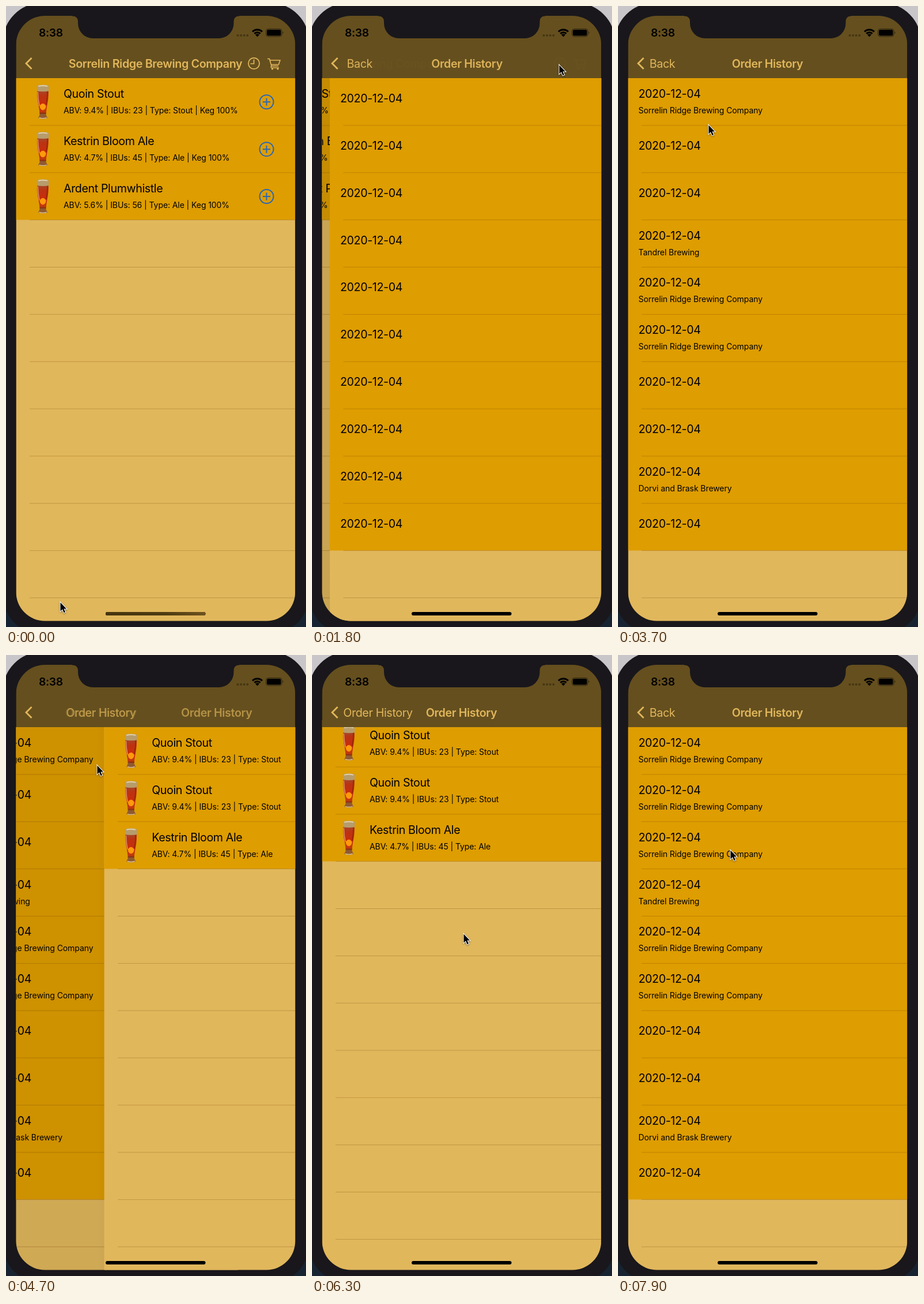
Animation of 521 by 1076 pixels, one loop 8 s. Source, as an HTML page with a canvas:

```html
<!DOCTYPE html>
<html lang="en">
<head>
<meta charset="utf-8">
<title>Order history</title>
<style>
html, body { margin: 0; width: 521px; height: 1076px; overflow: hidden; background: #19171b; }
canvas { display: block; }
</style>
</head>
<body>
<canvas id="stage" width="521" height="1076"></canvas>
<script>
const c = document.getElementById('stage').getContext('2d');
const LEFT = 17.5, RIGHT = 502.3, WIDTH = RIGHT - LEFT, TOP = 125, ROW = 81.85;
const GOLD = '#e1b75c', ORANGE = '#de9d00', BAR = '#654f1e';

const BREWERY = 'Sorrelin Ridge Brewing Company';
const stout = ['Quoin Stout', 'ABV: 9.4% | IBUs: 23 | Type: Stout'];
const ale = ['Kestrin Bloom Ale', 'ABV: 4.7% | IBUs: 45 | Type: Ale'];
const orange = ['Ardent Plumwhistle', 'ABV: 5.6% | IBUs: 56 | Type: Ale'];
const menu = [stout, ale, orange], order = [stout, stout, ale];

// brewery and the time its line appears, per order row
const orders = [
  [BREWERY, 3450], [BREWERY, 7550], [BREWERY, 7750], ['Tandrel Brewing', 3100],
  [BREWERY, 2800], [BREWERY, 2600], null, null, ['Dorvi and Brask Brewery', 2300], null
];

const cursorPath = [
  [0, 93, 1031], [100, 93, 1031], [900, 400, 160], [1300, 428, 100], [1900, 428, 100],
  [2300, 250, 815], [2600, 220, 575], [2800, 215, 493], [3100, 200, 411], [3500, 160, 215],
  [3700, 156, 204], [4300, 157, 189], [4800, 157, 189], [5500, 262, 508], [6050, 262, 508],
  [6300, 262, 481], [6450, 262, 481], [6950, 107, 93], [7250, 107, 93], [7550, 190, 240],
  [7800, 194, 336], [8000, 194, 336]
];

const clamp = v => Math.max(0, Math.min(1, v));
const smooth = v => (v = clamp(v), v * v * (3 - 2 * v));
const spring = ms => {
  const x = Math.max(0, ms) * 0.014;
  return x > 8 ? 1 : 1 - (1 + x) * Math.exp(-x);
};
const pushHistory = t => spring(t - 1412);
const pushDetail = t => t < 7027 ? spring(t - 4532) : 1 - spring(t - 7027);
const scrollAt = t => -13 * (t < 6300 ? smooth((t - 6050) / 250) : 1 - spring(t - 6310));

function text(s, x, y, size = 19.6, weight = 400, color = '#000', align = 'left') {
  c.font = `${weight} ${size}px Inter, Roboto, sans-serif`;
  c.letterSpacing = size > 16 ? '-0.36px' : '-0.08px';
  c.fillStyle = color;
  c.textAlign = align;
  c.fillText(s, x, y);
}

function rect(x, y, w, h, color) {
  c.fillStyle = color;
  c.fillRect(x, y, w, h);
}

function shape(d, fill, stroke, width = 2) {
  const path = new Path2D(d);
  if (fill) { c.fillStyle = fill; c.fill(path); }
  if (stroke) { c.strokeStyle = stroke; c.lineWidth = width; c.stroke(path); }
}

function round(x, y, w, h, r, color) {
  c.beginPath();
  c.roundRect(x, y, w, h, r);
  c.fillStyle = color;
  c.fill();
}

function ring(x, y, r, color, width = 2) {
  c.beginPath();
  c.arc(x, y, r, 0, 7);
  c.strokeStyle = color;
  c.lineWidth = width;
  c.stroke();
}

const beerFill = c.createLinearGradient(0, 22, 0, 62);
[[0, '#a5482a'], [0.2, '#bb3312'], [0.6, '#c92d0a'], [0.9, '#c53a0c'], [1, '#7d2f14']]
  .forEach(([at, color]) => beerFill.addColorStop(at, color));

function glass(x, y) {
  c.save();
  c.translate(x, y);
  shape('M-5 59H5Q5 64 8 69Q0 72.5 -8 69Q-5 64 -5 59Z', '#8f5a30');
  shape('M-10 21H10Q10 36 7.5 47Q6 55 5.5 62H-5.5Q-6 55 -7.5 47Q-10 36 -10 21Z', beerFill);
  shape('M-8.8 24Q-8.5 37 -6 48', null, '#e0a27a', 1.3);
  shape('M8 23Q8 36 5.5 47', null, '#8e2008', 1.3);
  shape('M-5.5 48Q0 40 5.5 48Q5 55 0 55.5Q-5 55 -5.5 48Z', '#ff9a0c');
  shape('M-6.5 68.5Q0 71 6.5 68.5', null, '#d8c29a', 1.5);
  shape('M-10.5 14Q-10 11.5 0 11.5Q10 11.5 10.5 14L10 22.5Q0 24 -10 22.5Z', '#b79c6c');
  shape('M-8 14Q0 12 8 14', null, '#dfcfa7', 2);
  c.restore();
}

function beerRow([name, info], y, keg) {
  glass(46.5, y);
  text(name, 82.5, y + 34);
  text(info + (keg ? ' | Keg 100%' : ''), 82.5, y + 61, 14);
  if (keg) {
    ring(435, y + 41.3, 12, '#2868b8');
    shape(`M428.5 ${y + 41.3}h13M435 ${y + 34.8}v13`, null, '#2868b8');
  }
}

function orderRow(entry, y, t) {
  const loaded = entry && t >= entry[1];
  text('2020-12-04', 18, y + (loaded ? 34 : 42));
  if (loaded) text(entry[0], 18, y + 61, 14);
}

function page(x, scroll, rows, drawRow) {
  c.save();
  c.translate(LEFT + x, 0);
  rect(0, TOP, WIDTH, 960, GOLD);
  rect(0, TOP + scroll, WIDTH, rows.length * ROW, ORANGE);
  rows.forEach((row, i) => drawRow(row, TOP + scroll + i * ROW));
  for (let i = 1; i < 13; i++)
    rect(23.5, TOP + scroll + i * ROW - 0.4, WIDTH, 1, 'rgba(115,75,0,.3)');
  c.restore();
}

// left page slides at 30 % speed and dims beneath the incoming one
function slide(p, under, over) {
  const x = WIDTH * (1 - p);
  if (p < 1) under(-0.3 * WIDTH * p);
  if (p > 0) {
    const edge = LEFT + x, shade = c.createLinearGradient(edge - 12, 0, edge, 0);
    rect(LEFT, TOP, x, 960, `rgba(0,0,0,${0.11 * p})`);
    shade.addColorStop(0, 'rgba(0,0,0,0)');
    shade.addColorStop(1, `rgba(0,0,0,${0.1 * p * (1 - p)})`);
    rect(edge - 12, TOP, 12, 960, shade);
    over(x);
  }
}

function icons() {
  ring(430.5, 99.5, 9.6, GOLD, 1.7);
  shape('M430.5 92.5V100H424.5', null, GOLD, 1.7);
  shape('M454 91.5H457.5L461 104H473M458.5 94H476L473.5 101.5H460.5M461 104Q459 107 462 107H474', null, GOLD, 1.6);
  c.fillStyle = GOLD;
  for (const x of [462.5, 472]) {
    c.beginPath();
    c.arc(x, 109, 1.6, 0, 7);
    c.fill();
  }
}

const bars = [
  { title: BREWERY, back: '', mid: 55, icons },
  { title: 'Order History', back: 'Back', mid: 77 },
  { title: 'Order History', back: 'Order History', mid: 114.5 }
];

function navBar(from, to, q) {
  const put = (s, x, alpha, weight) => {
    c.globalAlpha = clamp(alpha);
    text(s, x, 106.5, 19.7, weight, GOLD, 'center');
  };
  const x = 259.5 + (to.mid - 259.5) * q;
  c.save();
  c.beginPath();
  c.rect(37, TOP - 50, RIGHT - 37, 50);
  c.clip();
  put(from.title, x, 1 - q, 600);
  put(to.back, x, q, 400);
  put(from.back, from.mid - 127 * q, 1 - 1.2 * q, 400);
  put(to.title, 259.5 + 305 * (1 - q), q, 600);
  if (from.icons) {
    c.globalAlpha = 1 - q;
    from.icons();
  }
  c.restore();
  shape('M44.5 90L35 99.5L44.5 109', null, GOLD, 2.8);
}

function statusBar() {
  text('8:38', 57, 53, 19.3, 600);
  for (let i = 0; i < 4; i++) {
    c.beginPath();
    c.arc(402.5 + i * 5.6, 51, 2, 0, 7);
    c.fillStyle = '#463614';
    c.fill();
  }
  c.strokeStyle = '#000';
  c.lineWidth = 3;
  for (const r of [12, 7.2]) {
    c.beginPath();
    c.arc(436.5, 53, r, -Math.PI * 0.75, -Math.PI * 0.25);
    c.stroke();
  }
  shape('M436.5 53.5L433 49.8Q436.5 47 440 49.8Z', '#000');
  c.beginPath();
  c.roundRect(451.5, 39.5, 27.5, 13.5, 4);
  c.strokeStyle = '#30260e';
  c.lineWidth = 1;
  c.stroke();
  round(453, 41, 24.5, 10.5, 2.5, '#000');
  shape('M480.5 44Q483 46.2 480.5 48.5Z', '#30260e');
}

function homeBar(t) {
  round(173, 1050, 173.5, 6, 3, '#000');
  const fade = 1 - smooth((t - 100) / 400);
  if (!fade) return;
  const tint = c.createLinearGradient(173, 0, 346, 0);
  tint.addColorStop(0, '#46350f');
  tint.addColorStop(0.6, '#4e3b12');
  tint.addColorStop(1, '#6e531e');
  c.globalAlpha = fade;
  round(173, 1050, 173.5, 6, 3, tint);
  c.globalAlpha = 1;
}

function cursor(t) {
  const i = cursorPath.findIndex(k => k[0] > t);
  const a = cursorPath[i - 1], b = cursorPath[i], k = smooth((t - a[0]) / (b[0] - a[0]));
  c.save();
  c.translate(a[1] + (b[1] - a[1]) * k, a[2] + (b[2] - a[2]) * k);
  c.shadowColor = 'rgba(0,0,0,.35)';
  c.shadowBlur = 3;
  c.shadowOffsetY = 1;
  const arrow = 'M1.5 2.5V17.5L5 14.3L7.6 20.3L10 19.3L7.4 13.4H12Z';
  shape(arrow, '#fff', '#fff', 2);
  c.shadowColor = 'transparent';
  shape(arrow, '#000');
  c.restore();
}

function draw(t) {
  rect(0, 0, 521, 538, '#c8c6c9');
  rect(0, 538, 521, 538, '#172330');
  round(-6, -6, 533, 1095, 70, '#19171b');

  c.save();
  c.beginPath();
  c.roundRect(LEFT, 17, WIDTH, 1048.5, 50);
  c.clip();
  const history = x => page(x, 0, orders, (row, y) => orderRow(row, y, t));
  if (t < 4500) slide(pushHistory(t), x => page(x, 0, menu, (row, y) => beerRow(row, y, true)), history);
  else slide(pushDetail(t), history, x => page(x, scrollAt(t), order, (row, y) => beerRow(row, y)));

  rect(LEFT, 17, WIDTH, TOP - 17, BAR);
  if (t < 4500) navBar(bars[0], bars[1], pushHistory(t - 10));
  else navBar(bars[1], bars[2], pushDetail(t - 10));
  statusBar();
  homeBar(t);
  c.restore();

  shape('M115 16H405V17.5Q395.5 17.5 395.5 27V30A26 26 0 0 1 369.5 56H151A26 26 0 0 1 125 30V27Q125 17.5 115 17.5Z', '#19171b');
  cursor(t);
}

function tick() {
  draw(performance.now() % 8000);
  requestAnimationFrame(tick);
}
tick();
</script>
</body>
</html>
```
